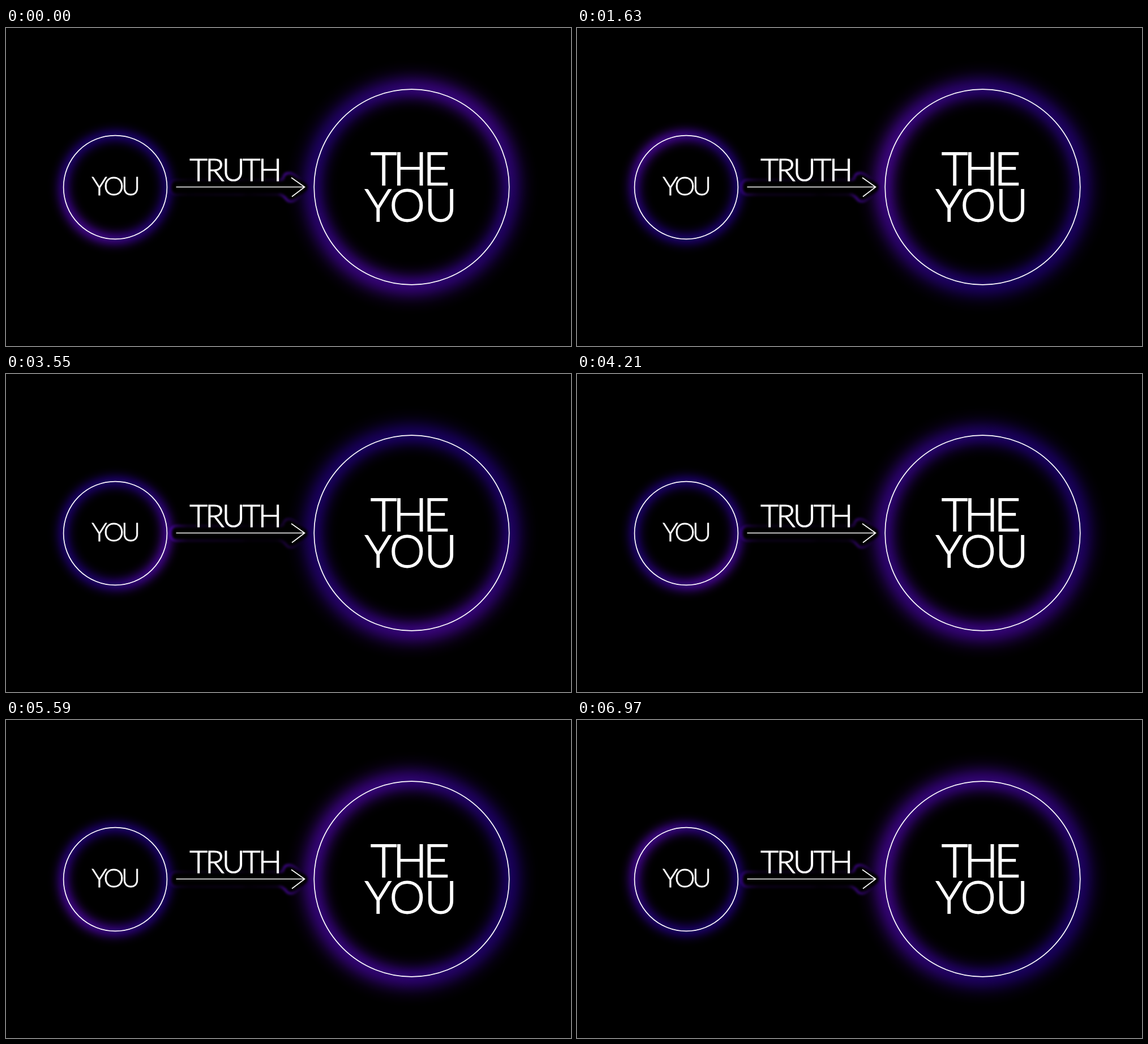
Animation of 998 by 561 pixels, one loop 7.02 s. Source, as an HTML page with a canvas:

```html
<!DOCTYPE html>
<html lang="en">
<head>
<meta charset="utf-8">
<title>Truth diagram</title>
<style>
  html, body { margin: 0; width: 100%; height: 100%; overflow: hidden; background: #000; }
  canvas { display: block; width: 998px; height: 561px; }
</style>
</head>
<body>
<canvas id="stage" width="998" height="561"></canvas>
<script>
const W = 998, H = 561, LOOP = 7020;
const stage = document.getElementById('stage').getContext('2d');

function layer() {
  const c = document.createElement('canvas');
  c.width = W;
  c.height = H;
  return c.getContext('2d');
}

const small = { x: 193, y: 281, r: 91.4, inside: 14, outside: 13.5 };
const big = { x: 716.5, y: 280.5, r: 172.3, inside: 20, outside: 25 };

// Key times and values; angles in degrees, clockwise from the right.
const times = [0, 1630, 2590, 3550, 4880, 6300, 6970];
const tracks = {
  smallLobe: [122, 235, 296, 385, 457, 532, 578],
  bigLobe: [110, 195, 250, 435, 460, 500, 535],
  bigPower: [0.85, 1, 0.8, 0.9, 0.7, 0.75, 0.85],
  sideLobe: [300, 310, 320, 540, 575, 610, 640],
  sidePower: [0.85, 0.2, 0.8, 0.05, 1.15, 0.6, 0.65],
  tail: [0.25, 0.6, 0.55, 0.75, 0.25, 0.35, 0.55],
  head: [0.9, 0.85, 0.8, 0.4, 0.85, 0.9, 0.8]
};

function at(track, t) {
  let i = 0;
  while (i < times.length - 2 && t >= times[i + 1]) i++;
  const k = Math.min(1, (t - times[i]) / (times[i + 1] - times[i]));
  return track[i] + (track[i + 1] - track[i]) * k;
}

function lobe(angle, center) {
  const c = 0.5 + 0.5 * Math.cos((angle - center) * Math.PI / 180);
  return c * c * c;
}

const glow = layer();

// Angular colour, faded to both sides of the rim.
function drawGlow({ x, y, r, inside, outside }, lobes) {
  const conic = glow.createConicGradient(0, x, y);
  for (let i = 0; i <= 36; i++) {
    let p = 0;
    for (const [center, power] of lobes) p += power * lobe(i * 10, center);
    p = Math.min(1.15, p);
    conic.addColorStop(i / 36, `rgb(${23 + 33 * p},${4 * p},${88 + 30 * p})`);
  }
  const inner = r - 2.5 * inside, outer = r + 2.5 * outside;
  const fade = glow.createRadialGradient(x, y, inner, x, y, outer);
  for (let i = 0; i <= 24; i++) {
    const d = inner + (outer - inner) * i / 24 - r;
    const a = Math.exp(-Math.pow(d / (d < 0 ? inside : outside), 2));
    const edge = Math.min(1, i / 4, (24 - i) / 4);
    fade.addColorStop(i / 24, `rgba(0,0,0,${a * edge})`);
  }
  glow.globalCompositeOperation = 'source-over';
  glow.clearRect(0, 0, W, H);
  glow.fillStyle = conic;
  glow.fillRect(0, 0, W, H);
  glow.globalCompositeOperation = 'destination-in';
  glow.fillStyle = fade;
  glow.fillRect(0, 0, W, H);
  stage.drawImage(glow.canvas, 0, 0);
}

const halo = new Path2D('M303 268H484Q490 268 490 263Q492 256 500 256Q507 256 513 262' +
  'L530 274Q536 281 530 288L514 301Q505 309 497 304Q490 295 484 294' +
  'H303Q291 294 291 281Q291 268 303 268Z');

// A dark gap around the arrow with a thin lit edge.
function drawHalo(tail, head) {
  const g = stage.createLinearGradient(288, 0, 536, 0);
  const stops = [[0, tail], [0.05, tail * 0.75], [0.13, tail * 0.3], [0.5, 0.14],
    [0.56, 0.06], [0.77, head * 0.2], [0.83, head], [0.88, head * 0.7], [0.95, 0.05], [1, 0]];
  for (const [p, a] of stops) g.addColorStop(p, `rgba(78,8,170,${a})`);
  stage.save();
  stage.filter = 'blur(2px)';
  stage.globalCompositeOperation = 'source-over';
  stage.fillStyle = '#000';
  stage.fill(halo);
  stage.globalCompositeOperation = 'lighter';
  stage.strokeStyle = g;
  stage.lineWidth = 4;
  stage.stroke(halo);
  stage.restore();
}

function circle(c, { x, y, r }) {
  c.beginPath();
  c.arc(x, y, r, 0, Math.PI * 2);
  c.stroke();
}

function word(c, text, cx, base, size, spacing, bold) {
  c.font = `300 ${size}px Lato, "Open Sans", sans-serif`;
  c.letterSpacing = spacing + 'px';
  const m = c.measureText(text);
  const x = cx - (m.actualBoundingBoxRight - m.actualBoundingBoxLeft) / 2;
  c.fillText(text, x, base);
  c.lineWidth = bold;
  c.strokeText(text, x, base);
}

function drawLines(c) {
  c.strokeStyle = c.fillStyle = '#fff';
  c.lineJoin = 'miter';
  c.lineWidth = 1.7;
  circle(c, small);
  circle(c, big);
  c.stroke(new Path2D('M300.5 280.5H527M504 264L527.5 280.5L505 297.5'));
  word(c, 'YOU', 192.5, 295, 46, -5, 0.8);
  word(c, 'TRUTH', 403, 269.5, 55, -3.8, 1.2);
  word(c, 'THE', 712.5, 276.5, 80, -6.8, 1.8);
  word(c, 'YOU', 711.5, 341, 79, -0.8, 1.8);
}

function frame(now) {
  const t = now % LOOP;
  const v = name => at(tracks[name], t);
  stage.globalCompositeOperation = 'source-over';
  stage.fillStyle = '#000';
  stage.fillRect(0, 0, W, H);
  stage.globalCompositeOperation = 'lighter';
  drawGlow(small, [[v('smallLobe'), 1]]);
  drawGlow(big, [[v('bigLobe'), v('bigPower')], [v('sideLobe'), v('sidePower')]]);
  drawHalo(v('tail'), v('head'));
  stage.globalCompositeOperation = 'source-over';
  drawLines(stage);
}

const start = performance.now();
function tick() {
  frame(performance.now() - start);
  requestAnimationFrame(tick);
}
tick();
</script>
</body>
</html>
```
